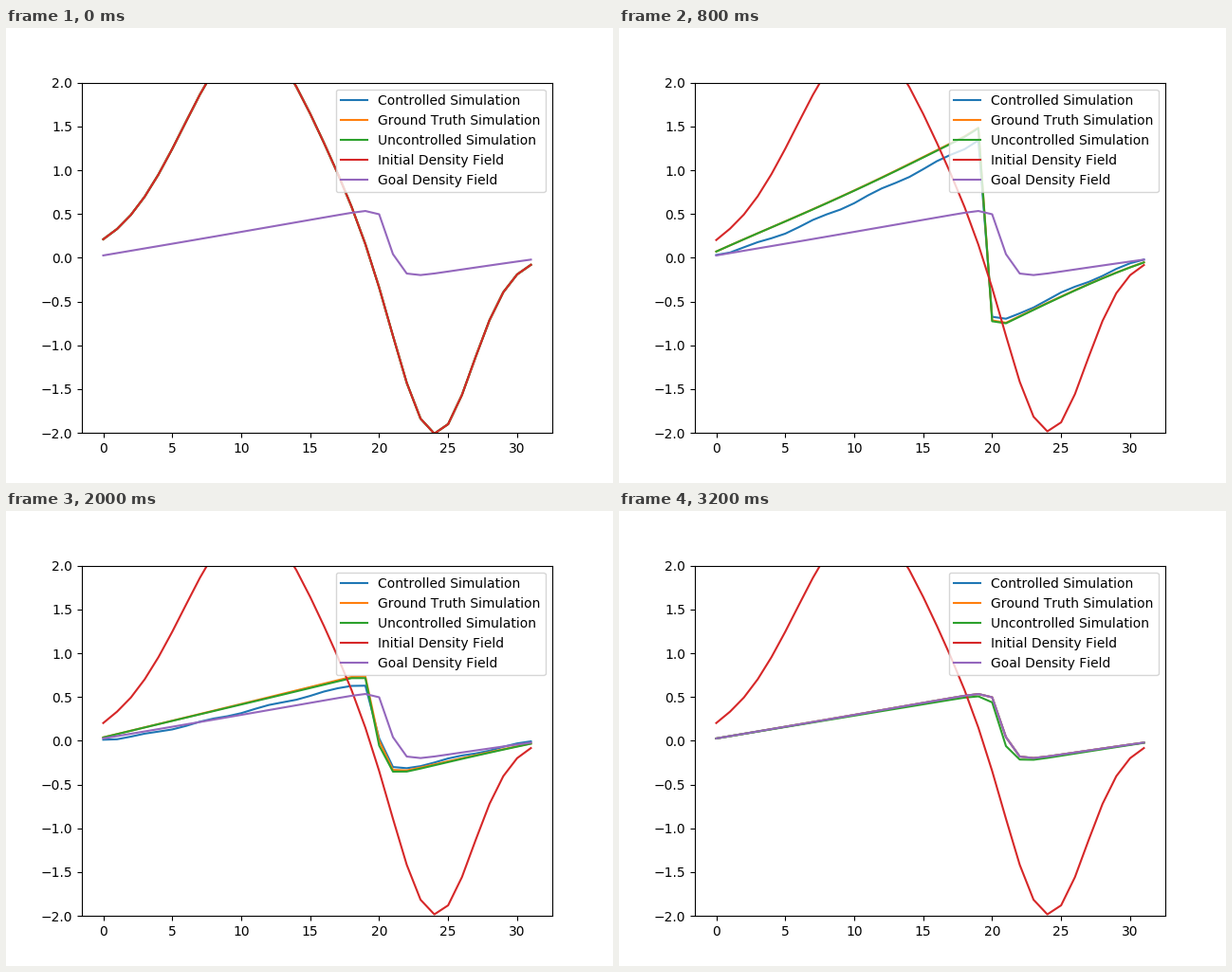
Write a matplotlib script that moves like this. It is 640 by 480 pixels and loops after 3.3 s.

```python
import numpy as np
import matplotlib.pyplot as plt
from matplotlib.animation import FuncAnimation

plt.rcParams["text.kerning_factor"] = 6

N, STEPS = 32, 32
DT = 0.03 * N
NU = 0.003 * 0.03 * N ** 2
SHOCK = 19.5
x = np.arange(N)


def bell(amp, mid, width):
    return amp * np.exp(-0.5 * ((x - mid) / width) ** 2)


def diffuse(u):
    p = np.pad(u, 1)
    return u + NU * (p[2:] - 2 * u + p[:-2])


def advect(u):
    """Semi-Lagrangian self-advection with zero values outside."""
    return np.interp(x - DT * u, np.arange(-1, N + 1), np.pad(u, 1))


def burgers(u, force=0.0):
    states = [u]
    for _ in range(STEPS):
        states.append(advect(diffuse(states[-1])) + force)
    return np.array(states)


def control(n):
    """Detour of the controlled run: damped on both sides of the shock."""
    depth = 0.14 * np.sin(np.pi * (n / STEPS) ** 0.6)
    shape = np.where(x < SHOCK, np.exp(-(x + 0.5) / 2) - 1, 0.25)
    ripple = 0.09 * np.sin(1.4 * x + 0.5 * n)
    return depth * (shape + ripple)


start = bell(2.49, 10.66, 4.8) - bell(2.06, 24, 2.75)
free = burgers(start)
truth = burgers(start, bell(0.0016, 18, 7))

fig, ax = plt.subplots(figsize=(6.4, 4.8), dpi=100)
labels = ["Controlled Simulation", "Ground Truth Simulation",
          "Uncontrolled Simulation", "Initial Density Field",
          "Goal Density Field"]
lines = [ax.plot(x, start, label=name)[0] for name in labels]
ax.set_ylim(-2, 2)
ax.legend(loc="upper right")


def draw(n):
    initial = diffuse(start) if n else start
    fields = truth[n] + control(n), truth[n], free[n], initial, truth[-1]
    for line, field in zip(lines, fields):
        line.set_ydata(field)
    return lines


anim = FuncAnimation(fig, draw, frames=STEPS + 1, interval=100,
                     repeat=True, repeat_delay=0)
plt.show()
```
